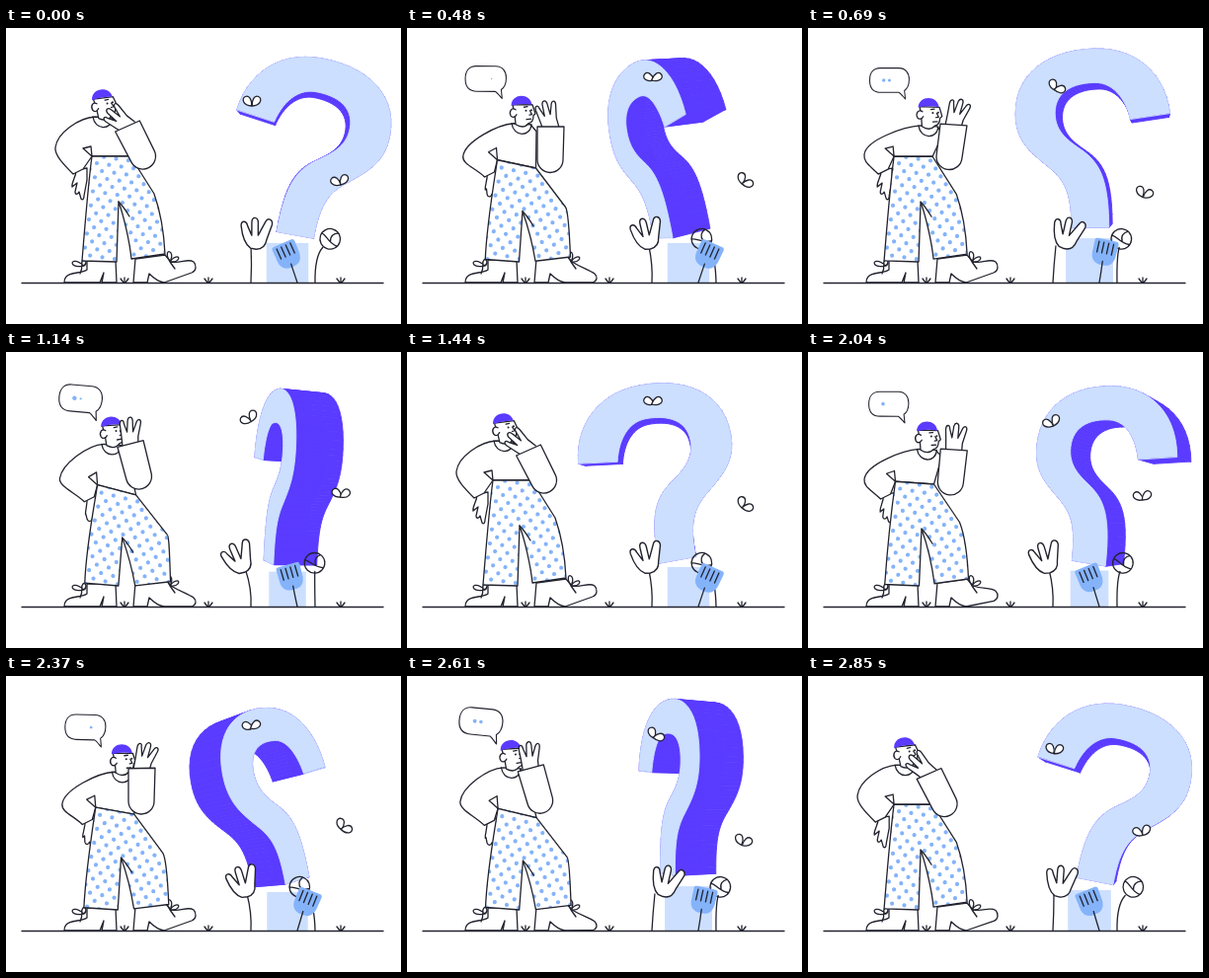
Recreate the animation shown at these times as an HTML page with a canvas. Size 400 by 300 pixels, loop 2.88 s.

```html
<!DOCTYPE html>
<html lang="en">
<head>
<meta charset="utf-8">
<title>Thinking it over</title>
<style>
  html, body { margin: 0; width: 100%; height: 100%; overflow: hidden; background: #fff; }
  canvas { display: block; width: 400px; height: 300px; }
</style>
</head>
<body>
<canvas id="stage" width="400" height="300"></canvas>
<script>
const ctx = document.getElementById('stage').getContext('2d');
const INK = '#22232e', PURPLE = '#5a3bff', LIGHT = '#ccdfff', BLUE = '#84b3fa';
const TAU = Math.PI * 2, RAD = Math.PI / 180;
const LOOP = 2880, STEP = 30, SPIN = 1440, SWAY = 960;
const { sin, cos, abs, max, min, atan2 } = Math;
const clamp = v => max(0, min(1, v));

// ---------- drawing helpers ----------
function paint(path, fill, stroke = INK) {
  if (fill) { ctx.fillStyle = fill; ctx.fill(path); }
  if (stroke) { ctx.strokeStyle = stroke; ctx.stroke(path); }
}
const draw = (d, fill, stroke) => paint(new Path2D(d), fill, stroke);
const line = d => draw(d, null);
function at(x, y, deg, scale, fn) {
  ctx.save();
  ctx.translate(x, y);
  ctx.rotate(deg * RAD);
  ctx.scale(scale, scale);
  fn();
  ctx.restore();
}
function disc(x, y, r, fill, stroke) {
  const p = new Path2D();
  p.arc(x, y, r, 0, TAU);
  paint(p, fill, stroke);
}
function polygon(pts) {
  const p = new Path2D();
  pts.forEach(([x, y], i) => i ? p.lineTo(x, y) : p.moveTo(x, y));
  p.closePath();
  return p;
}

// ---------- spinning question mark ----------
function trace(start, curves) {
  const pts = [start];
  let [x0, y0] = start;
  for (const [x1, y1, x2, y2, x3, y3] of curves) {
    for (let i = 1; i <= 14; i++) {
      const s = i / 14, r = 1 - s;
      const a = r * r * r, b = 3 * r * r * s, c = 3 * r * s * s, d = s * s * s;
      pts.push([a * x0 + b * x1 + c * x2 + d * x3, a * y0 + b * y1 + c * y2 + d * y3]);
    }
    [x0, y0] = [x3, y3];
  }
  return pts;
}
const outer = trace([-80.5, -161], [
  [-76, -200, -48, -225, -8, -225],
  [38, -225, 70.5, -203, 70.5, -163],
  [70.5, -137, 57, -126, 40, -112],
  [22, -98, 15.5, -86, 15.5, -51]
]);
const inner = trace([-42.7, -156], [
  [-38, -176, -26, -192, -8, -192],
  [16, -192, 31, -182, 31, -163],
  [31, -146, 20, -137, 7, -128],
  [-12, -115, -21, -100, -21, -51]
]);
const glyph = outer.concat(inner.reverse());
const area = pts => pts.reduce((sum, [x, y], i) => {
  const [u, v] = pts[(i + 1) % pts.length];
  return sum + x * v - u * y;
}, 0);

function questionMark(t) {
  const a = t / SPIN * TAU, w = t / SWAY * TAU;
  const turn = a - 0.075 * sin(2 * a);   // lingers a little when facing us
  const tilt = 10.5 * RAD * cos(w + 0.15), bob = 7.2 * sin(w);
  const project = z => glyph.map(([x, y]) => {
    const rx = x * cos(turn) + z * sin(turn);
    const depth = z * cos(turn) - x * sin(turn);
    const px = 286 + rx * cos(tilt) - y * sin(tilt);
    const py = 258 + bob + rx * sin(tilt) + y * cos(tilt);
    const k = 590 / (590 - depth);
    return [285 + (px - 285) * k, 145 + (py - 145) * k];
  });
  const front = project(22.5), back = project(-22.5);
  ctx.lineWidth = 0.9;
  front.forEach((p, i) => {
    const j = (i + 1) % front.length;
    paint(polygon([p, front[j], back[j], back[i]]), PURPLE, PURPLE);
  });
  if (area(front) > 0) paint(polygon(front), LIGHT, LIGHT);
  if (area(back) < 0) paint(polygon(back), LIGHT, LIGHT);
}

// ---------- things around the mark ----------
function dot(w) {
  const width = 42.5 - 5.5 * sin(w), height = 40 - 5 * sin(w);
  ctx.fillStyle = LIGHT;
  ctx.fillRect(285 - width / 2, 258 - height, width, height);
}
function openHand(w) {
  const x = 249 + 17 * cos(w - 0.8 * TAU);
  line(`M248 258Q249 240 ${248 + (x - 254) * 0.3} 221`);
  at(x, 208, (x - 254) * 1.3, 1.08, () => draw(
    'M-6 14C-12 10 -14 2 -15 -7C-15 -12 -10 -12 -9 -7L-5 2L-5 -10C-5 -16 1 -16 1 -10' +
    'L1 2L8 -11C10 -15 15 -13 14 -8L9 6C8 12 5 15 -1 15Z', '#fff'));
}
function roundHand(w) {
  const c = cos(w + 0.07 * TAU), x = 313.3 + 16.5 * c;
  line(`M313 258Q312.5 232 ${(x + 313) / 2} 222.5`);
  at(x, 213.8, c * 20, 1, () => {
    disc(0, 0, 10.3);
    line('M-9.5 -3C-4 -2 -1 4 8.5 5M1 2C-1 -3 2 -7 6 -8');
  });
}
function blueHand(w) {
  const c = -cos(w - 0.05 * TAU), x = 295 + 10.5 * c, y = 226.5 + 4 * c * c;
  const deg = 25 * c;
  at(x, y, deg, 1, () => {
    draw('M-12 -11Q-12 -13 -9 -13L10 -13Q12.5 -13 12.5 -10L12 3C11 10 7 13 2 13L-3 13C-9 12 -12 8 -12 2Z', BLUE, null);
    line('M-7.5 -10V1M-2.5 -10V1M2.5 -10V1M7.5 -10V1');
  });
  line(`M${x - 9 * sin(deg * RAD)} ${y + 9}Q${x * 0.4 + 295 * 0.6} 246 295 258`);
}
function moth(x, y, deg, flap) {
  at(x, y, deg, 1, () => {
    for (const side of [-1, 1]) {
      ctx.save();
      ctx.scale(side, 1);
      ctx.rotate(flap * RAD);
      draw('M0 4C0 -2 3 -7 7 -5C11 -3 9 4 0 4Z', '#fff');
      ctx.restore();
    }
  });
}

// ---------- thinker ----------
const KEYS = [0, 270, 480, 690, 930, 1140];
function pose(time, vals) {
  const n = KEYS.length;
  let i = n - 1;
  while (KEYS[i] > time) i--;
  const s = (time - KEYS[i]) / ((KEYS[i + 1] || SPIN) - KEYS[i]);
  const [a, b, c, d] = [-1, 0, 1, 2].map(k => vals[(i + k + n) % n]);
  return b + s * ((c - a) + s * ((2 * a - 5 * b + 4 * c - d) + s * (3 * (b - c) + d - a))) / 2;
}

function shoes(lift) {
  draw('M82 235L82 245C77 249 65 247 61 252C59 254 59 258 59 258L95 258L99 248L97 258L112 258L111 235Z', '#fff');
  line('M79 241C70 233 65 237 68 240C71 243 76 241 79 241C83 238 80 233 78 235C75 238 79 241 75 249');
  const toe = 249 - 12 * lift, sole = 258 - 10 * lift;
  draw(`M131 234L129 258L143 258L145 249C149 253 154 257 160 258L188 ${sole}C193 ${sole - 2} 193 ${toe + 3}` +
    ` 190 ${toe}C184 ${toe - 4} 177 ${243 - 4 * lift} 167 237L161 230Z`, '#fff');
  line('M166 237C161 229 164 224 167 228C169 231 167 235 166 237C171 230 177 231 174 235C172 238 169 237 166 237L171 244');
}

function trousers(h) {
  const wl = [87 + 6 * h, 130 + 5 * h], wr = [126 + 6 * h, 130 + 16 * h];
  const crotch = [114 + 4 * h, 176 + 13 * h], knee = [150 + 14 * h, 168 + 18 * h];
  const shape = new Path2D(
    `M${wl}C${wl[0] - 4} 160 ${80 + h} 200 ${77 + 3 * h} ${236 - 2 * h}L${112 + 2 * h} 237` +
    `L${crotch}C${crotch[0] + 5} ${crotch[1] + 14} ${125 + 2 * h} 215 ${127 + 4 * h} ${234 + 3 * h}` +
    `L${161 + 6 * h} ${229 + 4 * h}C${160 + 6 * h} 208 ${156 + 10 * h} 185 ${knee}L${wr}Z`);
  ctx.fillStyle = '#fff';
  ctx.fill(shape);
  ctx.save();
  ctx.clip(shape);
  ctx.translate(92 + 5 * h, 137 + 6 * h);
  ctx.rotate((8 + 6 * h) * RAD);
  for (let r = -4; r < 20; r++)
    for (let c = -4; c < 9; c++)
      disc(c * 12.5 + (r & 1) * 6.25, r * 7.2, 2.1, BLUE, null);
  ctx.restore();
  paint(shape);
  line(`M${crotch}Q${crotch[0] + 5} ${crotch[1] + 5} ${crotch[0] + 11} ${crotch[1] + 15}`);
}

function head(x, y, u) {
  at(x, y, -7 + 9 * u, 1, () => {
    draw('M-7 5L-6 15Q2 20 7 14C11 13 12 10 12 6L14 4L11 -5L-9 -5Z', '#fff');
    draw('M-10.5 -4C-10 -17 9 -17 10.5 -5Q0 -7 -10.5 -4Z', PURPLE, null);
    draw('M-6 0C-10 -3 -13 2 -11 6C-9 9 -6 7 -5 5', '#fff');
    disc(4.5, 1, 1, INK, null);
    disc(10, 0.5, 1, INK, null);
    line('M2.5 -2.5L6 -3M8.5 1L10.5 5L8 5.5M5 10L9.5 9.5');
  });
}

function forearm(time) {
  const cx = pose(time, [123, 138, 145.5, 147.5, 137.5, 126]);
  const cy = pose(time, [99.5, 103, 100, 98, 93.5, 93]);
  const tilt = pose(time, [-24, -16, 0, 4, -1, -14]) * RAD;
  const ex = pose(time, [138.5, 143, 145, 143, 137, 134.5]);
  const ey = pose(time, [130, 135, 133.5, 130.5, 127, 126]);
  const reach = pose(time, [-52, -55, -16, 16, 15, -2]);
  const d = atan2(ey - cy, ex - cx);
  at(cx, cy, reach, 1, () => draw(
    'M-8 3L-9 -10L-10 -20C-10 -25 -6 -25 -6 -21L-3 -12L-2 -24C-1 -28 3 -28 3 -23' +
    'L3 -12L7 -22C9 -26 12 -24 11 -20L8 -7L8 3', '#fff'));
  const p = new Path2D();
  p.moveTo(cx - 13.5 * cos(tilt), cy - 13.5 * sin(tilt));
  p.lineTo(cx + 13.5 * cos(tilt), cy + 13.5 * sin(tilt));
  p.arc(ex, ey, 13, d - TAU / 4, d + TAU / 4);
  p.closePath();
  paint(p, '#fff');
}

function bubble(time, t, u) {
  const size = min(clamp((time - 130) / 100), clamp((1300 - time) / 100));
  if (!size) return;
  const x = 71.5 + 11 * u, y = 41 + 20 * u - 8 * u * u;
  at(x, y, 8 * (1 - u) * (time > 720 ? 1 : 0.3), size * (0.95 + 0.14 * (1 - u)), () => {
    ctx.lineWidth = 1.1;
    draw('M-10 -13L10 -13C17 -13 21 -8 21 -1C21 5 19 9 16 11L17 20C15 18 12 14 10 13' +
      'L-9 13C-17 13 -21 8 -21 0C-21 -8 -17 -13 -10 -13Z', '#fff');
    const q = (t / 480 + 0.76) % 1;
    [0.1, 0.32, 0.55].forEach((peak, i) => {
      const gap = min(abs(q - peak), 1 - abs(q - peak));
      if (gap < 0.27) disc(i * 6 - 6, 0, 2.2 * cos(gap / 0.27 * TAU / 4), BLUE, null);
    });
  });
}

function thinker(t) {
  const time = t % SPIN, a = time / SPIN * TAU;
  const u = (1 - cos(a)) / 2, h = sin(a) ** 2, e = 1 - h;
  const hx = 98 + 24 * u, hy = 76 + 9 * u;
  const elbow = [50 + 7 * u + 2 * h, 121 + 7 * u + 5 * h];
  const wrist = [68 + 3 * u + 11 * h, 148 + 4 * h];
  const waistL = [87 + 6 * h, 130 + 5 * h], waistR = [126 + 6 * h, 130 + 16 * h];
  const nook = [78 + 6 * h, 122 + 5 * h];

  shoes(pose(time, [1, 0.4, 0, 1, 1, 0]));
  // hand on the hip, fingers closing as the hips swing
  at(...wrist, -6 * h, 1, () => draw(
    `M3 -4C3 4 ${-2 * e} 8 ${-e} 13L${4 * e} ${13 - 4 * e}L${1 + e} 18C2 21 5 21 6 18` +
    `L${6 + 2 * e} ${18 + 7 * e}C10 ${20 + 7 * e} 11 ${19 + 6 * e} 11 ${17 + 5 * e}L14 6L14 -6Z`, '#fff'));
  // jumper
  draw(`M${hx - 8} ${hy + 14}C${hx - 24} ${hy + 15} ${elbow[0] + 2} ${elbow[1] - 15} ${elbow}` +
    `C${elbow[0] - 1} ${elbow[1] + 8} ${wrist[0] - 9} ${wrist[1] - 9} ${wrist}L${wrist[0] + 10} ${wrist[1] - 5}` +
    `L${waistL}L${waistR}L${hx + 15} ${hy + 22}L${hx + 9} ${hy + 15}Z`, '#fff');
  line(`M${nook[0] + 8} ${nook[1] - 2 - 3 * h}L${nook}L${waistL}L${nook[0] + 8} ${nook[1] - 2 - 3 * h}`);
  trousers(h);
  head(hx, hy, u);
  line(`M${hx - 10} ${hy + 14}C${hx - 8} ${hy + 28} ${hx + 9} ${hy + 28} ${hx + 10} ${hy + 15}`);
  forearm(time);
  bubble(time, t, u);
}

// ---------- scene ----------
function ground() {
  line('M16 258.5H382');
  for (const x of [120, 205, 339])
    line(`M${x - 1} 258L${x - 4} 254M${x} 258V253M${x + 1} 258L${x + 4} 254`);
}

function render(t) {
  const w = t / SWAY * TAU;
  ctx.fillStyle = '#fff';
  ctx.fillRect(0, 0, 400, 300);
  ctx.lineJoin = ctx.lineCap = 'round';
  questionMark(t);
  ctx.lineWidth = 1.3;
  dot(w);
  openHand(w);
  roundHand(w);
  blueHand(w);
  moth(249 - 3 * sin(w), 62 + 13 * cos(w), -35 * sin(w), 8 - 12 * cos(w));
  moth(340 - 2 * cos(w), 155 - 13 * sin(w), 14 - 28 * cos(w), 4 + 8 * sin(w));
  thinker(t);
  ground();
}

function tick() {
  const t = performance.now() % LOOP;
  render(Math.floor(t / STEP) * STEP);
  requestAnimationFrame(tick);
}
tick();
</script>
</body>
</html>
```
